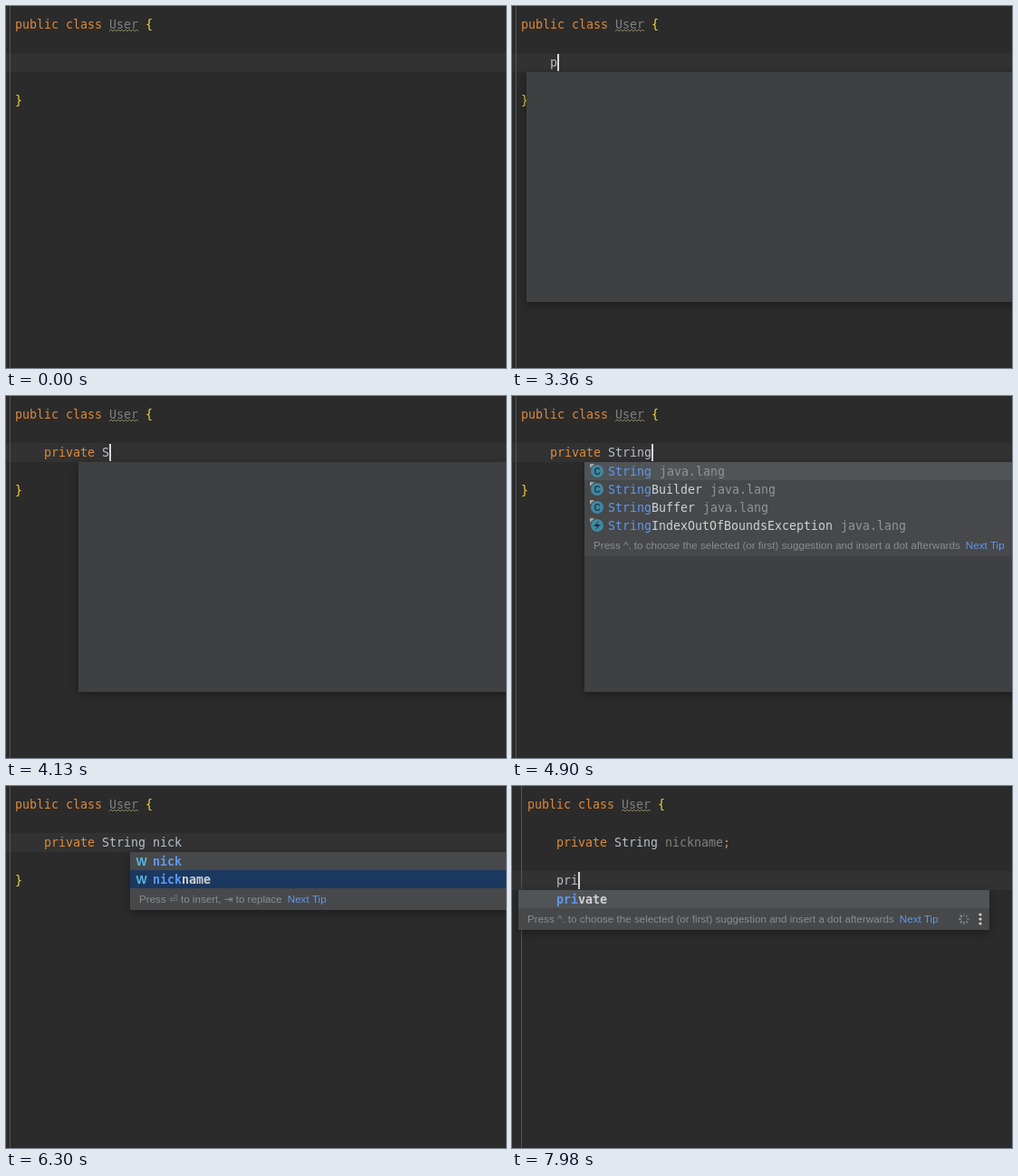
An HTML page with a canvas that plays this animation: 552x400 px, repeating every 8000 ms.

```html
<!DOCTYPE html>
<html lang="en">
<head>
<meta charset="utf-8">
<title>Code completion</title>
<style>
html, body { margin: 0; width: 100%; height: 100%; overflow: hidden; background: #2b2b2b; }
canvas { display: block; }
</style>
</head>
<body>
<canvas id="stage" width="552" height="400"></canvas>
<script>
const ctx = document.getElementById('stage').getContext('2d');
const LOOP = 8000, CHAR = 8, LINE = 21, ROW = 20;
const MONO = '13.29px "DejaVu Sans Mono", monospace';
const SANS = '11.63px "Liberation Sans", Arial, sans-serif';
const C = {
  bg: '#2b2b2b', line: '#323232', edge: '#555555', caret: '#d8d8d8',
  key: '#df8a38', text: '#b7c0cc', dim: '#808080', brace: '#f7d43c',
  panel: '#3e4042', list: '#46484a', active: '#505457', focus: '#1b3860',
  item: '#cfd1d2', pkg: '#929496', match: '#5f97ee', teal: '#3f87a3', hint: '#8b8d8f'
};

// Time and content of the edited lines
const edits = [[0, ''], [3150, '    ']];
const type = (base, word, times) =>
  times.forEach((t, i) => edits.push([t, base + word.slice(0, i + 1)]));
const PRIV = '    private ', DECL = PRIV + 'String nickname;';
type('    ', 'pri', [3290, 3430, 3500]);
edits.push([3780, PRIV]);
type(PRIV, 'String ', [4060, 4270, 4410, 4550, 4690, 4830, 4970]);
type(PRIV + 'String ', 'nick', [5110, 5250, 5390, 5530]);
edits.push([6440, DECL.slice(0, -1)], [6860, DECL], [7070, DECL + '\n    '], [7280, DECL + '\n\n    ']);
type(DECL + '\n\n    ', 'pri', [7700, 7840, 7910]);

// Item: icon, name, package
const item = s => s.split(' ');
const keywords = ['private', 'protected', 'public'].map(k => ['', k, '']);
const classes = [
  'd PageRight com.intellij.ui.ScrollPaneActions',
  'd PolynomialRingGF2 org.bouncycastle.pqc.math.linearalgebra',
  'c PolynomialRingGF2m org.bouncycastle.pqc.math.linearalgebra',
  'o PrebuiltIndexAwareIdIndexer com.intellij.index',
  'f PrimaryClassNodeOperation org.codehaus.groovy.control.CompilationUnit',
  'f PrimaryKey com.intellij.util.xml',
  'f PrimeCertaintyCalculator org.bouncycastle.jcajce.provider.asymmetric',
  'f PrimeFinder gnu.trove',
  'f PrimeFinder org.jetbrains.coverage.gnu.trove',
  'f Primes org.bouncycastle.math',
  'f Primitive com.android.aapt.Resources'
].map(item);
const types = [
  'd String java.lang', 'd StringBuilder java.lang', 'd StringBuffer java.lang',
  'x StringIndexOutOfBoundsException java.lang', 'd StrictMath java.lang',
  'd System java.lang', 'd Short java.lang', 'x SecurityException java.lang',
  'd Stack java.util', 'c Set java.util', 'c Stream java.util.stream', 'c Scanner java.util'
].map(item);
const starts = (list, p) => list.filter(i => i[1].startsWith(p));

const CHOOSE = 'Press ^. to choose the selected (or first) suggestion and insert a dot afterwards';
const INSERT = 'Press ⏎ to insert, ⇥ to replace';
const popups = [
  { from: 3360, to: 3780, fill: 3430, x: 16, tx: 42, y: 73, h: 254,
    items: p => starts(keywords, p).concat(classes) },
  { from: 4060, to: 4970, fill: 4200, x: 80, tx: 106, y: 73, h: 254, items: p => starts(types, p) },
  { from: 5110, to: 6440, x: 137, tx: 162, y: 73, focus: 6090,
    items: p => [['w', p, ''], ['w', 'nickname', '']] },
  { from: 7770, to: LOOP, x: 7, tx: 49, y: 115, w: 520, busy: true, items: p => starts(keywords, p) }
];

function rect(x, y, w, h, color) {
  ctx.fillStyle = color;
  ctx.fillRect(x, y, w, h);
}

function text(s, x, y, color, font = MONO) {
  ctx.font = font;
  ctx.fillStyle = color;
  ctx.fillText(s, x, y);
  return x + ctx.measureText(s).width;
}

function disc(x, y, r, color) {
  ctx.fillStyle = color;
  ctx.beginPath();
  ctx.arc(x, y, r, 0, 7);
  ctx.fill();
}

function path(points, color) {
  ctx.fillStyle = color;
  ctx.beginPath();
  points.forEach(p => ctx.lineTo(p[0], p[1]));
  ctx.fill();
}

// Indexes of matched letters: a plain prefix, or humps of a camel-case name
function matched(name, prefix) {
  const hits = new Set();
  let at = -1;
  for (const c of prefix.toLowerCase()) {
    const next = name[at + 1] || '';
    at = next.toLowerCase() === c ? at + 1 : name.indexOf(c.toUpperCase(), at + 1);
    if (at < 0) break;
    hits.add(at);
  }
  return hits;
}

function icon(kind, x, y) {
  if (!kind) return;
  if (kind === 'w') {
    text('W', x - 6.5, y + 5, '#58b6dc', 'bold 13px "Liberation Sans", sans-serif');
    return;
  }
  if (kind === 'f') {
    path([[x - 2, y - 8], [x + 6, y - 8], [x + 6, y], [x - 6, y], [x - 6, y - 4]], '#9da2a5');
    rect(x - 7, y, 14, 8, C.teal);
    text('01', x - 4.5, y + 7, '#dbe6ea', 'bold 8px "Liberation Sans", sans-serif');
    return;
  }
  disc(x, y, 7, C.teal);
  if (kind === 'x') {
    path([[x + 2, y - 5], [x - 4, y + 1], [x, y + 1], [x - 2, y + 5], [x + 4, y - 1], [x, y - 1]], '#23323a');
  } else {
    text('C', x - 3.6, y + 3.8, '#25363e', 'bold 10px "Liberation Sans", sans-serif');
  }
  if (kind === 'd' || kind === 'x') {
    path([[x - 8, y - 8], [x - 3, y - 8], [x - 8, y - 3]], '#a3a8ab');
  }
  if (kind === 'o') {
    path([[x - 7, y - 7], [x - 3, y - 7], [x - 3, y + 7], [x - 7, y + 7]], '#9da2a5');
    path([[x + 1, y + 1], [x + 8, y + 1], [x + 4, y + 8]], '#e0893c');
  }
}

function row(entry, p, y, prefix) {
  const [kind, name, pkg] = entry;
  const font = kind && kind !== 'w' ? MONO : 'bold ' + MONO;
  const hits = matched(name, prefix);
  icon(kind, p.tx - 12, y + 10);
  [...name].forEach((c, i) =>
    text(c, p.tx + i * CHAR, y + 14.5, hits.has(i) ? C.match : C.item, font));
  if (pkg) text(pkg, p.tx + (name.length + 1) * CHAR + 1, y + 14.5, C.pkg);
}

function spinner(x, y, t) {
  ctx.lineWidth = 1.5;
  for (let i = 0; i < 8; i++) {
    const a = i * Math.PI / 4, shade = 100 + (i + Math.floor(t / 70)) % 8 * 8;
    ctx.strokeStyle = `rgb(${shade},${shade},${shade})`;
    ctx.beginPath();
    ctx.moveTo(x + 3 * Math.cos(a), y + 3 * Math.sin(a));
    ctx.lineTo(x + 6 * Math.cos(a), y + 6 * Math.sin(a));
    ctx.stroke();
  }
}

function popup(p, t, prefix) {
  const items = p.items(prefix), w = p.w || 560 - p.x;
  const rows = Math.min(items.length * ROW, 230), end = p.y + rows;
  ctx.save();
  ctx.shadowColor = 'rgba(0,0,0,.35)';
  ctx.shadowBlur = 10;
  ctx.shadowOffsetY = 3;
  rect(p.x, p.y, w, p.h || rows + 24, C.panel);
  ctx.restore();
  if (t < p.fill) return;

  rect(p.x, p.y, w, rows + 24, C.list);
  const focused = t >= p.focus;
  ctx.save();
  ctx.beginPath();
  ctx.rect(p.x, p.y, w, rows);
  ctx.clip();
  rect(p.x, p.y + (focused ? ROW : 0), w, ROW, focused ? C.focus : C.active);
  items.forEach((entry, i) => row(entry, p, p.y + i * ROW, prefix));
  ctx.restore();

  const stop = text(focused ? INSERT : CHOOSE, p.x + 10, end + 16, C.hint, SANS);
  text('Next Tip', stop + 6, end + 16, C.match, SANS);
  if (p.busy) {
    spinner(p.x + 492, end + 12, t);
    [7, 12, 17].forEach(dy => disc(p.x + 510, end + dy, 1.6, '#d0d2d3'));
  }
}

function code(s, x, y, t) {
  for (const m of s.matchAll(/\S+/g)) {
    const semi = m[0].endsWith(';'), word = semi ? m[0].slice(0, -1) : m[0];
    const left = x + m.index * CHAR;
    const color = /^(public|class|private)$/.test(word) ? C.key
      : /[{}]/.test(word) ? C.brace
      : word === 'User' || (word === 'nickname' && t >= 7350) ? C.dim : C.text;
    text(word, left, y, color);
    if (semi) text(';', left + word.length * CHAR, y, C.key);
  }
}

function wave(x, y, w) {
  ctx.strokeStyle = '#8b8460';
  ctx.lineWidth = 1;
  ctx.beginPath();
  for (let i = 0; i <= w; i += 2) ctx.lineTo(x + i, y + (i % 4 ? -1 : 1));
  ctx.stroke();
}

function caretOn(t, since) {
  if (t < 3150) return (t >= 770 && t < 1540) || (t >= 2310 && t < 3010);
  return Math.floor((t - since) / 700) % 2 === 0;
}

function draw(t) {
  const [since, body] = edits.filter(e => e[0] <= t).pop();
  const lines = body.split('\n'), last = lines[lines.length - 1];
  const shift = lines.length > 1 ? 7 : 0, x = 10 + shift;
  const baseline = n => 25 + n * LINE;
  const current = 1 + lines.length, top = 10 + current * LINE;

  rect(0, 0, 552, 400, C.bg);
  rect(0, top, 552, LINE, C.line);
  rect(4 + (shift && 6), 0, 1, 400, C.edge);

  code('public class User {', x, baseline(0), t);
  wave(x + 104, 27, 32);
  lines.forEach((s, i) => code(s, x, baseline(2 + i), t));
  code('}', x, baseline(3 + lines.length), t);
  if (caretOn(t, since)) rect(x + last.length * CHAR, top + 1, 2, 19, C.caret);

  const open = popups.find(p => t >= p.from && t < p.to);
  if (open) popup(open, t, last.split(' ').pop());
}

function frame(now) {
  draw(now % LOOP);
  requestAnimationFrame(frame);
}
draw(0);
requestAnimationFrame(frame);
</script>
</body>
</html>
```
